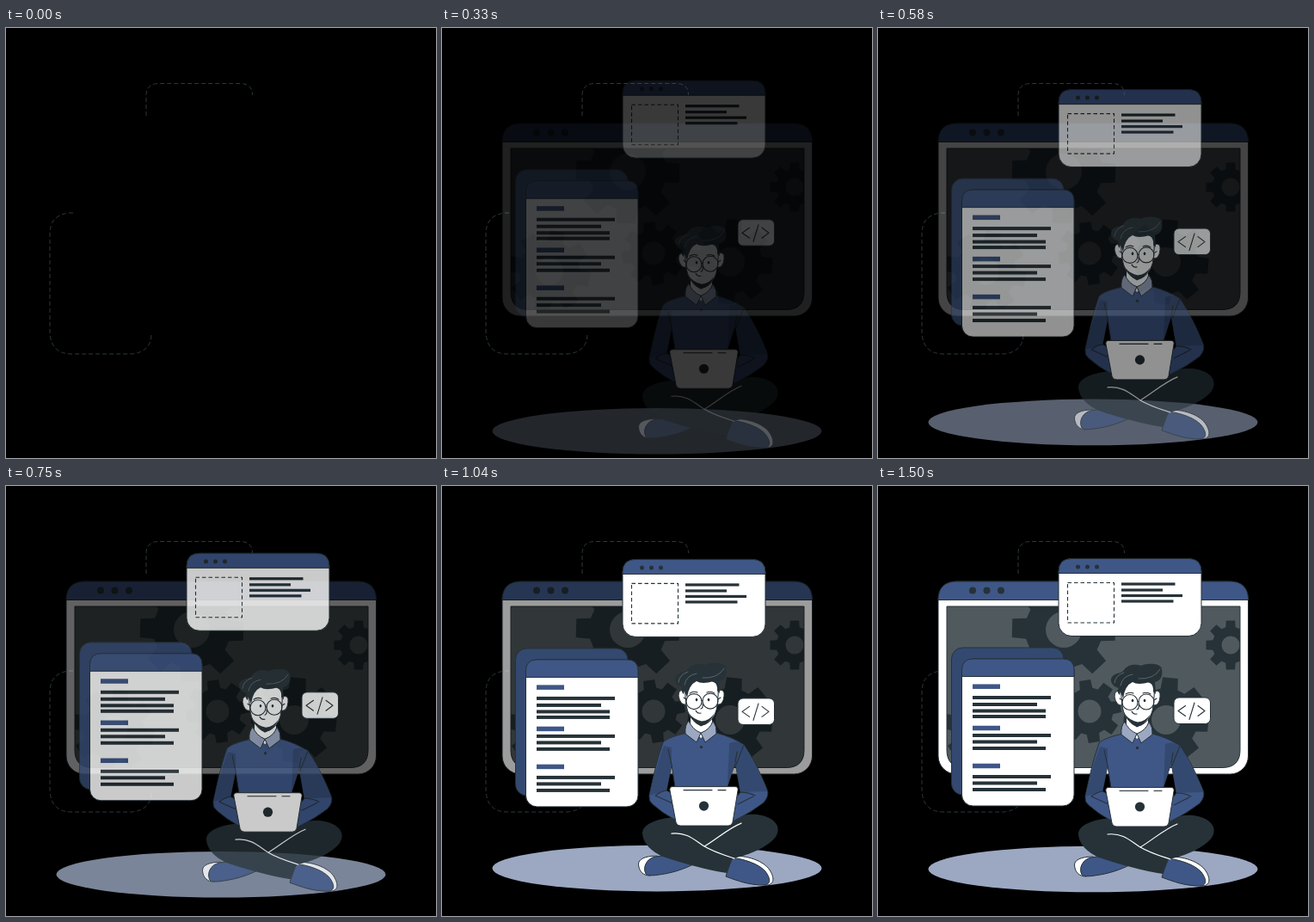
Write an HTML page that moves like this. It is 500x500 px and loops after 1620 ms.

```html
<!DOCTYPE html>
<html lang="en">
<head>
<meta charset="utf-8">
<title>Developer at work</title>
<style>
  html, body { margin: 0; width: 100%; height: 100%; overflow: hidden; background: #000; }
  svg { display: block; width: 100%; height: 100%; }
  .ink { fill: #263238; }
  .blue { fill: #3f5787; }
  .deep { fill: #344970; }
  .pale { fill: #9ca8c2; }
  .white { fill: #fff; }
  .edge { stroke: #263238; stroke-width: 1; stroke-linejoin: round; }
  .line { fill: none; stroke: #263238; stroke-width: 1.1; stroke-linecap: round; stroke-linejoin: round; }
  .light { fill: none; stroke: #fff; stroke-width: 1.2; stroke-linecap: round; }
  .dash { fill: none; stroke: #2c383e; stroke-width: 1; stroke-dasharray: 5 3; }
  .shine { fill: none; stroke: #66727a; stroke-width: .8; stroke-linecap: round; }
</style>
</head>
<body>
<svg viewBox="0 0 500 500">
  <defs>
    <clipPath id="glass"><path d="M80 140H421V307Q421 327.500 400 327.500H101Q80 327.500 80 307Z"/></clipPath>
  </defs>

  <path class="dash" d="M163 102V79Q163 64.500 178 64.500H272Q286.500 64.500 286.500 78"/>
  <path class="dash" d="M78 215H74Q51 217 51 240V355Q53 379 76 379H146Q168 377 169 357"/>

  <g id="screen" opacity="0">
    <rect class="white edge" x="70" y="111" width="360.500" height="224" rx="21"/>
    <path class="blue edge" d="M70 132.500Q70 111 92 111H409Q430.500 111 430.500 132.500Z"/>
    <g class="ink">
      <circle cx="110" cy="121.500" r="4"/><circle cx="126.500" cy="121.500" r="4"/><circle cx="143" cy="121.500" r="4"/>
    </g>
    <path d="M80 140H421V307Q421 327.500 400 327.500H101Q80 327.500 80 307Z" fill="#50595e" class="edge"/>
    <g id="gears" class="ink" fill-rule="evenodd" clip-path="url(#glass)"></g>
  </g>

  <g id="docs" class="down" opacity="0">
    <rect class="deep edge" x="85.500" y="188" width="130.500" height="171" rx="13"/>
    <rect class="white edge" x="97.500" y="201" width="130.500" height="171" rx="13"/>
    <path class="blue edge" d="M97.500 221.500V214Q97.500 201 110.500 201H215Q228 201 228 214V221.500Z"/>
  </g>

  <g id="card" class="down" opacity="0">
    <rect class="white edge" x="210" y="84.500" width="166" height="90" rx="15"/>
    <path class="blue edge" d="M210 101.500V99.500Q210 84.500 225 84.500H361Q376 84.500 376 99.500V101.500Z"/>
    <g class="ink">
      <circle cx="232.500" cy="94" r="2.500"/><circle cx="243.500" cy="94" r="2.500"/><circle cx="254.500" cy="94" r="2.500"/>
    </g>
    <rect class="line" x="220.500" y="112.500" width="54" height="46.500" stroke-dasharray="4.500 3" style="stroke-linecap:butt"/>
  </g>

  <ellipse class="pale up" opacity="0" cx="250" cy="445.500" rx="191.500" ry="26.800"/>

  <g class="up" opacity="0">
    <!-- shoes -->
    <path class="white edge" d="M250 431C236 431 228 435 228.500 441C229 449 234 454 242 454L256 446Z"/>
    <path class="blue edge" d="M248 432C238 434 233 444 237 452Q241 455 252 453C268 451 282 446 292 441L262 430Z"/>
    <path class="white edge" d="M340 431C358 431 376 438 382 449C387 458 386 465 376 465L340 438Z"/>
    <path class="blue edge" d="M337 433C352 435 368 440 376 449C382 457 383 464 375 465C356 465 344 460 330 455Z"/>

    <!-- legs -->
    <path class="ink" d="M270 386C250 388 233 394 233 405C234 418 246 428 260 433C285 441 307 447 331 451L338 434C358 430 380 420 388 409C395 398 388 388 372 384C360 381 345 384 336 388Z"/>
    <path class="light" d="M267 405C285 403 294 413 305 420C317 427 328 430 340 434M348 393C333 399 320 411 305 420"/>

    <!-- sweater, open between arms and waist -->
    <path class="blue edge" fill-rule="evenodd" d="M285 288C272 291 262 294 257 299C250 318 245 342 241 361Q240 367 245 371Q256 381 271 389L340 390Q360 380 374 369Q381 361 378 354C370 334 361 316 351 302Q338 293 319 288ZM267 325L271 351L267 358L261 355ZM341 322L347 357L344 361L343 352L332 350Z"/>
    <path class="deep" d="M258 303C251 322 245 345 241 361L261 355L267 325V305ZM334 300L332 350L341 322L347 357L378 356Q368 330 351 302Q343 296 334 300Z"/>
    <path class="line" d="M263 307L267 325M261 355Q254 356 248 361M248 361L268 370M343 310L341 322M351 302L342 325M347 357Q357 357 364 361M362 362L344 371"/>

    <!-- neck and collar -->
    <path class="white" d="M289 266H314V285L301 294L289 283Z"/>
    <path class="pale edge" d="M287 274Q282 279 283 289L296 299L301 288Q291 284 287 274ZM315 274Q320 281 319 289L306 299L301 288Q312 284 315 274Z"/>
    <circle class="ink" cx="301.500" cy="304.500" r="1.700"/>

    <!-- head -->
    <path class="white edge" d="M283 239Q275 236 275 245Q277 256 284 255ZM321 239Q329 236 328 245Q327 256 320 255Z"/>
    <path class="white edge" d="M283 233Q282 258 288 268Q295 279 302 279Q311 278 317 267Q322 257 321 231L300 221Z"/>
    <path class="ink" d="M287 265Q291 275 301 280.500Q312 277 317 265Q311 274 302 274.500Q293 273 287 265Z"/>
    <path class="ink" d="M281 243C278 240 278 237 280 235C271 233 268 224 274 220C279 217 283 218 286 214C291 207 300 207 306 209C313 205 330 206 330 213C332 224 326 227 322 228L323 242L320 239Q321 233 316 228Q302 232 296 228Q287 232 285 247L282 239Z"/>
    <path class="shine" d="M275 229Q276 220 286 217M282 232Q284 221 296 219M303 224Q321 225 328 213"/>
    <g class="line">
      <circle cx="293" cy="251.500" r="9"/><circle cx="312" cy="251" r="9"/>
      <path d="M302 250.500H303M284 249L281 247M321 249L324 247M288 242Q292 239 297 241M308 241Q313 239 317 242M303 254Q304 259 301 260M295 262Q297 266 301 265"/>
    </g>
    <ellipse class="ink" cx="296" cy="249.500" rx="1.300" ry="1.800"/>
    <ellipse class="ink" cx="310" cy="249.500" rx="1.300" ry="1.800"/>

    <!-- laptop -->
    <path class="white edge" d="M268 350.500H341Q345 351 344 355L338 392Q337 396 333 396H277Q273 396 272 392L265 355Q264 351 268 350.500Z"/>
    <path class="line" d="M281 354.500H314M321 354.500H330"/>
    <circle class="ink" cx="304.500" cy="373" r="5.600"/>
  </g>

  <g class="down" opacity="0">
    <rect class="white edge" x="344" y="246" width="42.500" height="30.500" rx="6"/>
    <path class="line" d="M357.500 255.500L349 261.500L357.500 267.500M368 252L362 271.500M372 255.500L380 261.500L372 267.500"/>
  </g>
</svg>

<script>
const $ = s => document.querySelector(s);
const $$ = s => [...document.querySelectorAll(s)];
const NS = 'http://www.w3.org/2000/svg';

function add(parent, tag, attrs) {
  const el = document.createElementNS(NS, tag);
  for (const k in attrs) el.setAttribute(k, attrs[k]);
  parent.append(el);
}

function gear(cx, cy, r, hole, turn = 0) {
  const pts = [];
  for (let i = 0; i < 8; i++) {
    for (const [da, k] of [[-0.27, 0.74], [-0.18, 1], [0.18, 1], [0.27, 0.74]]) {
      const a = i * Math.PI / 4 + turn + da;
      pts.push((cx + r * k * Math.cos(a)).toFixed(1) + ' ' + (cy + r * k * Math.sin(a)).toFixed(1));
    }
  }
  const ring = `M${cx - hole} ${cy}a${hole} ${hole} 0 1 0 ${2 * hole} 0a${hole} ${hole} 0 1 0 ${-2 * hole} 0Z`;
  add($('#gears'), 'path', { d: 'M' + pts.join('L') + 'Z' + ring });
}

gear(216, 167, 61, 21, 0.03);
gear(246, 262, 37, 13.5, -0.15);
gear(335, 272, 50, 17, 0.1);
gear(410, 185, 29, 10.5);
gear(125, 283, 48, 16, 0.2);

// Text bars: [centre y, right end]
function bars(parent, x, h, cls, rows) {
  for (const [y, end] of rows)
    add(parent, 'rect', { x, y: y - h / 2, width: end - x, height: h, class: cls });
}
bars($('#docs'), 110, 5.5, 'blue', [[233.2, 142], [281.5, 142], [325.5, 142]]);
bars($('#docs'), 110, 4, 'ink', [
  [246, 201], [254, 185], [261.5, 195], [268, 195],
  [290, 201], [297.5, 185], [305, 195],
  [338, 201], [345.5, 185], [353, 195]
]);
bars($('#card'), 283, 3.2, 'ink', [[114, 345.5], [121, 331], [127.5, 354], [134, 343.5]]);

// Cubic bezier easing, solved by bisection
function ease(x, x1, y1, x2, y2) {
  const at = (s, a, b) => 3 * (1 - s) ** 2 * s * a + 3 * (1 - s) * s * s * b + s ** 3;
  let lo = 0, hi = 1;
  for (let i = 0; i < 24; i++) {
    const mid = (lo + hi) / 2;
    if (at(mid, x1, x2) < x) lo = mid; else hi = mid;
  }
  return at(lo, y1, y2);
}

const LOOP = 1620, STEP = 1000 / 24, LAST = 36, HIDDEN = 4, SHIFT = 30;
const down = $$('.down'), up = $$('.up'), screen = $('#screen');

function place(els, y, alpha) {
  for (const el of els) {
    el.setAttribute('transform', `translate(0 ${y.toFixed(2)})`);
    el.setAttribute('opacity', alpha);
  }
}

function draw(now) {
  const n = Math.min(LAST, Math.floor((now % LOOP + 5) / STEP));
  const x = Math.min(1, (n + 0.95) / LAST);
  const p = x < 1 ? ease(x, 0.36, -0.01, 0.5, 1.38) : 1;
  const shown = n >= HIDDEN;
  const alpha = shown ? Math.max(0, Math.min(1, p)) : 0;
  place(down, SHIFT * (p - 1), alpha);
  place(up, SHIFT * (1 - p), alpha);
  screen.setAttribute('opacity', shown ? x ** 1.5 : 0);
}

const start = performance.now();
function tick() {
  draw(performance.now() - start);
  requestAnimationFrame(tick);
}
tick();
</script>
</body>
</html>
```
